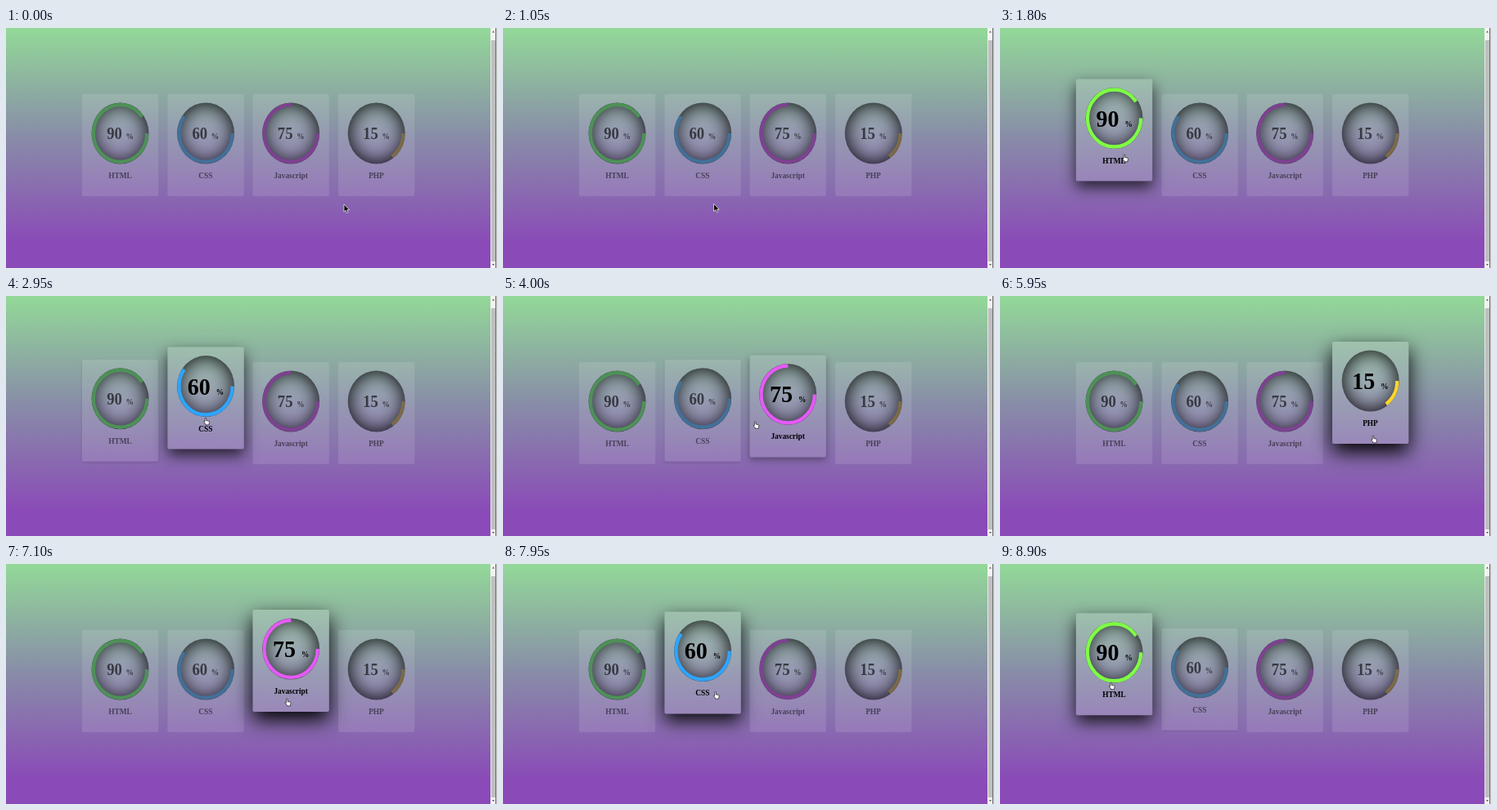
Recreate the animation shown at these times as an HTML page. Size 600 by 294 pixels, loop 8.95 s.

```html
<!DOCTYPE html>
<html lang="en">
<head>
<meta charset="utf-8">
<title>Skill cards</title>
<style>
  html, body { margin: 0; width: 100%; height: 100%; overflow: hidden; }
  body { position: relative; background: linear-gradient(#93d998, #888ba8 46%, #8a4ab8 90%); }

  /* cards are laid out in page units, then squeezed onto the stage */
  .page {
    position: absolute; left: 0; top: 0;
    transform: scale(.4667, .5); transform-origin: 0 0;
    font-family: "Liberation Serif", "Times New Roman", serif; font-weight: bold;
  }
  .card {
    --p: 0;
    position: absolute; top: 162px; width: 200px; height: 250px; border-radius: 4px;
    background: rgba(255, 255, 255, calc(.11 + .03 * var(--p)));
    transform: translateY(calc(-50px * var(--p)));
    box-shadow: 0 calc(20px * var(--p)) calc(50px * var(--p)) rgba(0, 0, 0, var(--p));
  }
  .dial {
    position: absolute; left: 25px; top: 21px; width: 150px; height: 150px;
    border-radius: 50%; box-shadow: inset 0 0 50px #000;
  }
  .dial svg { position: absolute; inset: 0; }
  .dial circle { fill: none; stroke: var(--dim); stroke-width: 9; }
  .num {
    position: absolute; inset: 0; display: flex; align-items: center;
    justify-content: center; font-size: 40px; white-space: pre;
    color: rgba(0, 0, 0, .62);
  }
  .num small { font-size: 20px; }
  .label {
    position: absolute; top: 188px; width: 100%;
    text-align: center; font-size: 20px; line-height: 23px;
    color: rgba(0, 0, 0, .52);
  }
  .on circle { stroke: var(--lit); }
  .on .num { font-size: 60px; }
  .on .num, .on .label { color: #000; }

  .bar { position: absolute; right: 0; top: 0; width: 8px; height: 100%; }
  .cursor { position: absolute; left: 0; top: 0; overflow: visible; }
</style>
</head>
<body>
<div class="page"></div>

<svg class="bar" viewBox="0 0 8 294">
  <path fill="#f3f3f3" d="M0 0H8V294H0Z"/>
  <path fill="#bfbfbf" d="M.8 15H6V286H.8Z"/>
  <path fill="#555" d="M2 5.5L3.5 3.5 5 5.5ZM2 289L3.5 291 5 289Z"/>
  <path fill="#333" d="M6.3 0H7.2V294H6.3Z"/>
</svg>

<svg class="cursor" width="1" height="1">
  <path id="arrow" fill="#000" stroke="#fff" stroke-width=".7"
    d="M0 0V9.2L2.2 7.3 3.6 10.6 5.2 9.9 3.8 6.8H6.6Z"/>
  <path id="hand" fill="#fff" stroke="#000" stroke-width=".7" transform="scale(.88)"
    d="M-1 1a.9 .9 0 0 1 1.8 0V4L4.4 4.8Q5.3 5 5.2 6L4.6 8.2V10H-.2V9L-2.6 6Q-2.7 4.8 -1 5.8Z"/>
</svg>

<script>
const LOOP = 8950, STEP = 50, RISE = 500;
const SCALE = .4667, FIRST = 199, PITCH = 223.5, WIDTH = 200;
const CARD_BOTTOM = 206;
const DASH = 2 * Math.PI * 70;

const skills = [
  { name: "HTML", pct: 90, dim: "#4d9157", lit: "#7fff45" },
  { name: "CSS", pct: 60, dim: "#427098", lit: "#2da5ff" },
  { name: "Javascript", pct: 75, dim: "#7e4192", lit: "#e45af5" },
  { name: "PHP", pct: 15, dim: "#7c6a47", lit: "#ffd728" }
];

// pointer tip: [ms, x, y], straight lines between
const route = [
  [0, 413, 216], [1540, 185, 215], [1800, 152, 155], [2680, 187, 152], [2950, 244, 149],
  [5050, 372.5, 158], [5950, 456, 171], [7100, 343.5, 165], [8575, 198, 150], [LOOP, 126, 144]
];

const page = document.querySelector(".page");
const cursor = document.querySelector(".cursor");
const arrow = document.getElementById("arrow");
const hand = document.getElementById("hand");

function pointAt(t) {
  const n = route.findIndex(p => p[0] > t);
  const [t0, x0, y0] = route[n - 1], [t1, x1, y1] = route[n];
  const k = (t - t0) / (t1 - t0);
  return [x0 + (x1 - x0) * k, y0 + (y1 - y0) * k];
}

function isOver(i, t) {
  const [x, y] = pointAt(t);
  const dx = x / SCALE - FIRST - i * PITCH;
  return y < CARD_BOTTOM && dx >= 0 && dx < WIDTH;
}

// times at which the pointer enters or leaves a card: [ms, +1 or -1]
function crossings(i) {
  const list = [];
  for (let t = 1; t < LOOP; t++) {
    const change = isOver(i, t) - isOver(i, t - 1);
    if (change) list.push([t, change]);
  }
  return list;
}

skills.forEach((s, i) => {
  s.crossings = crossings(i);
  s.el = document.createElement("div");
  s.el.className = "card";
  s.el.style.cssText = `left:${FIRST + i * PITCH}px;--dim:${s.dim};--lit:${s.lit}`;
  s.el.innerHTML = `
    <div class="dial">
      <svg viewBox="0 0 150 150"><circle cx="75" cy="75" r="70"
        stroke-dasharray="${DASH * s.pct / 100} ${DASH}"/></svg>
      <div class="num"><span>${s.pct} <small>%</small></span></div>
    </div>
    <div class="label">${s.name}</div>`;
  page.append(s.el);
});

// cubic-bezier(.25, .1, .25, 1), solved by bisection
const bezier = (a, b, u) => 3 * a * u * (1 - u) ** 2 + 3 * b * u * u * (1 - u) + u ** 3;
function ease(x) {
  if (x <= 0) return 0;
  if (x >= 1) return 1;
  let lo = 0, hi = 1;
  for (let k = 0; k < 20; k++) {
    const mid = (lo + hi) / 2;
    if (bezier(.25, .25, mid) < x) lo = mid; else hi = mid;
  }
  return bezier(.1, 1, lo);
}

function draw(t) {
  let hovering = false;
  skills.forEach((s, i) => {
    const on = isOver(i, t);
    const lift = s.crossings.reduce((sum, [at, dir]) => sum + dir * ease((t - at) / RISE), 0);
    s.el.style.setProperty("--p", lift.toFixed(4));
    s.el.classList.toggle("on", on);
    hovering ||= on;
  });
  const [x, y] = pointAt(t);
  cursor.style.transform = `translate(${x}px, ${y}px)`;
  arrow.style.display = hovering ? "none" : "";
  hand.style.display = hovering ? "" : "none";
}

const start = performance.now();
function tick() {
  const t = (performance.now() - start) % LOOP;
  draw(Math.floor(t / STEP) * STEP);
  requestAnimationFrame(tick);
}
tick();
</script>
</body>
</html>
```
